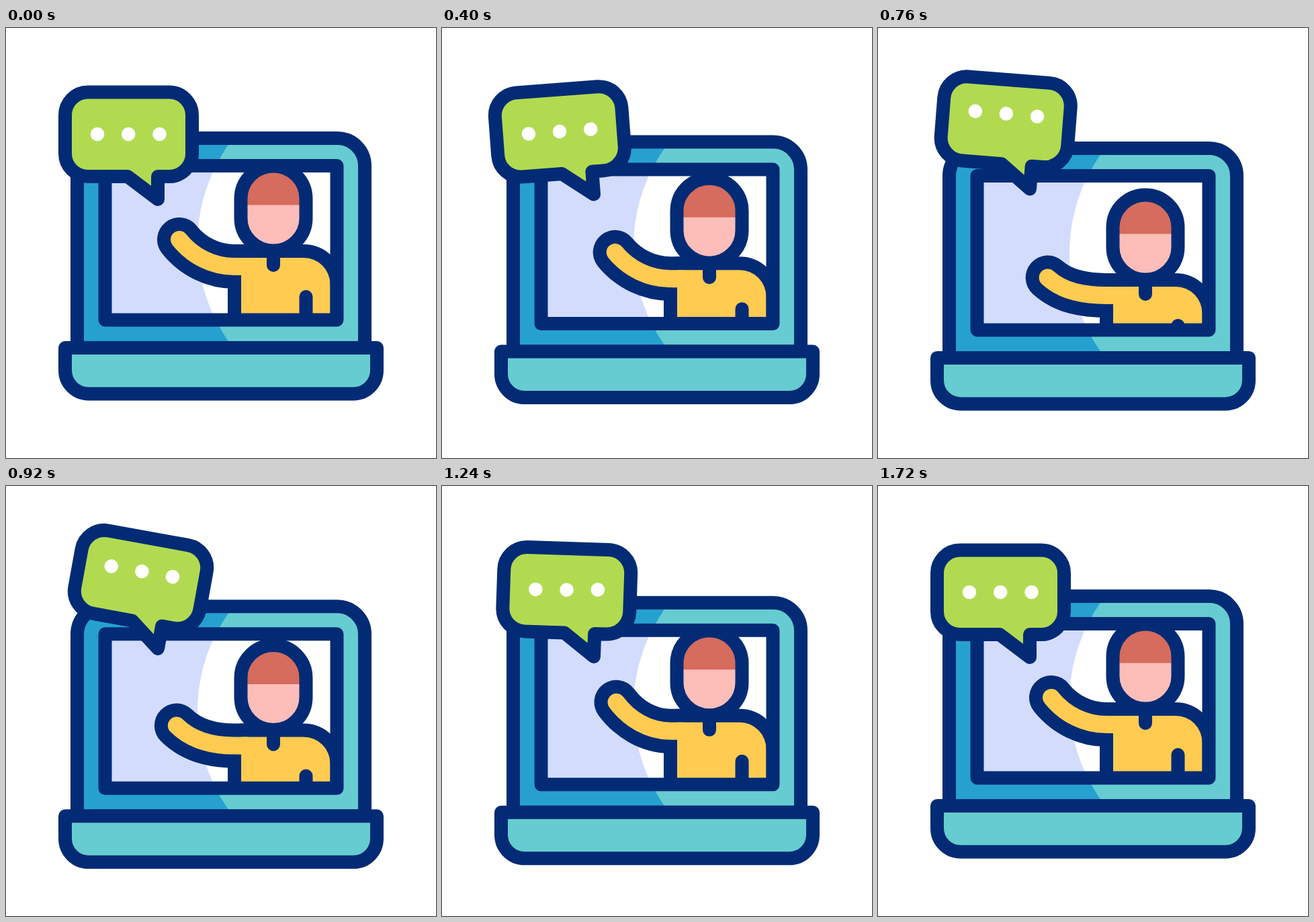
Animation, 640 px wide and 640 px high, one loop 1.76 s. Source, as an HTML page:

```html
<!DOCTYPE html>
<html lang="en">
<head>
<meta charset="utf-8">
<title>Video call</title>
<style>
  html, body { margin: 0; width: 100%; height: 100%; overflow: hidden; background: #fff; }
  svg { display: block; width: 100%; height: 100%; }
  .line { fill: none; stroke: #032b75; stroke-width: 20; stroke-linecap: round; stroke-linejoin: round; }
  .arm { fill: none; stroke-linecap: round; }
</style>
</head>
<body>
<svg viewBox="0 0 640 640">
  <defs>
    <path id="lid-shape" d="M106 476V205A41 41 0 0 1 147 164H493A41 41 0 0 1 534 205V476Z"/>
    <clipPath id="lid-clip"><use href="#lid-shape"/></clipPath>
    <clipPath id="screen-clip"><rect x="147.5" y="205" width="345" height="229.5"/></clipPath>
  </defs>

  <g id="laptop">
    <g clip-path="url(#lid-clip)">
      <rect x="100" y="160" width="440" height="320" fill="#26a1cf"/>
      <circle cx="540" cy="320" r="255" fill="#66ccd1"/>
    </g>
    <use href="#lid-shape" class="line"/>
    <g clip-path="url(#screen-clip)">
      <rect x="147" y="204" width="346" height="232" fill="#d3dcfd"/>
      <circle cx="540" cy="320" r="255" fill="#fff"/>
      <g id="person">
        <path class="arm" stroke="#032b75" stroke-width="66"/>
        <path d="M350 342H443A39.5 39.5 0 0 1 482.5 382V520H350Z" fill="#ffcb50"
              stroke="#032b75" stroke-width="40" stroke-linejoin="round" paint-order="stroke"/>
        <path class="arm" stroke="#ffcb50" stroke-width="26"/>
        <path class="line" d="M340 378V520M398 332V353M446.5 400V520"/>
        <rect x="349.5" y="205.5" width="97" height="126" rx="48.5" fill="#fdbdb9"/>
        <path d="M359 263.5V254A39 39 0 0 1 437 254V263.5Z" fill="#d56c5d"/>
        <rect class="line" x="349.5" y="205.5" width="97" height="126" rx="48.5"/>
      </g>
    </g>
    <rect class="line" x="147.5" y="205" width="345" height="229.5"/>
    <path class="line" style="fill:#66ccd1" d="M88 476H552V509.500A35 35 0 0 1 517 544.500H123A35 35 0 0 1 88 509.500Z"/>
  </g>

  <g id="bubble">
    <path class="line" style="fill:#b1da51"
          d="M122 95.500H243A34 34 0 0 1 277 129.500V187A34 34 0 0 1 243 221H226V255L181 221H122A34 34 0 0 1 88 187V129.500A34 34 0 0 1 122 95.500Z"/>
    <g fill="#fff">
      <circle class="dot" cx="136" cy="158" r="10.300"/>
      <circle class="dot" cx="182.200" cy="158" r="10.300"/>
      <circle class="dot" cx="228.500" cy="158" r="10.300"/>
    </g>
  </g>
</svg>
<script>
const LOOP = 1760;
const laptop = document.getElementById('laptop');
const person = document.getElementById('person');
const bubble = document.getElementById('bubble');
const arms = document.querySelectorAll('.arm');
const dots = document.querySelectorAll('.dot');

// Closed form of cubic-bezier(.5, 0, .5, 1)
function ease(x) {
  x = Math.min(1, Math.max(0, x));
  const u = 0.5 + Math.sinh(Math.asinh(4 * (x - 0.5)) / 3);
  return u * u * (3 - 2 * u);
}

// Starts at 0, then eases to each value within [start, end, value]
function track(t, ...moves) {
  let value = 0;
  for (const [start, end, to] of moves) {
    value += (to - value) * ease((t - start) / (end - start));
  }
  return value;
}

// Arm curve with its hand end turned around the shoulder
function armPath(deg) {
  const a = deg * Math.PI / 180, cos = Math.cos(a), sin = Math.sin(a);
  const turn = (x, y) => {
    const dx = x - 340, dy = y - 355;
    return `${340 + dx * cos - dy * sin} ${355 + dx * sin + dy * cos}`;
  };
  return `M${turn(258, 315)}C${turn(278, 340)} 308 355 340 355H358`;
}

function draw(t) {
  const drop = track(t, [40, 880, 15.4], [880, 1720, 0]);
  const duck = track(t, [168, 670, 29.3], [672, 1198, 0]);
  const swing = track(t, [340, 680, -9.2], [830, 1100, 2.3], [1100, 1720, 0]);
  const lift = track(t, [90, 725, -15.5], [725, 1375, 0]);
  const tilt = track(t, [220, 510, -5.9], [510, 950, 10.4], [950, 1378, 0]);

  laptop.setAttribute('transform', `translate(0 ${drop})`);
  person.setAttribute('transform', `translate(0 ${duck})`);
  bubble.setAttribute('transform', `translate(0 ${lift}) rotate(${tilt} 226 255)`);

  const d = armPath(swing);
  arms.forEach(arm => arm.setAttribute('d', d));
  dots.forEach((dot, i) => {
    const hop = track(t - i * 60, [383, 698, -12], [828, 1278, 0]);
    dot.setAttribute('cy', 158 + hop);
  });
}

const begin = performance.now();
function tick() {
  draw((performance.now() - begin) % LOOP);
  requestAnimationFrame(tick);
}
draw(0);
requestAnimationFrame(tick);
</script>
</body>
</html>
```
